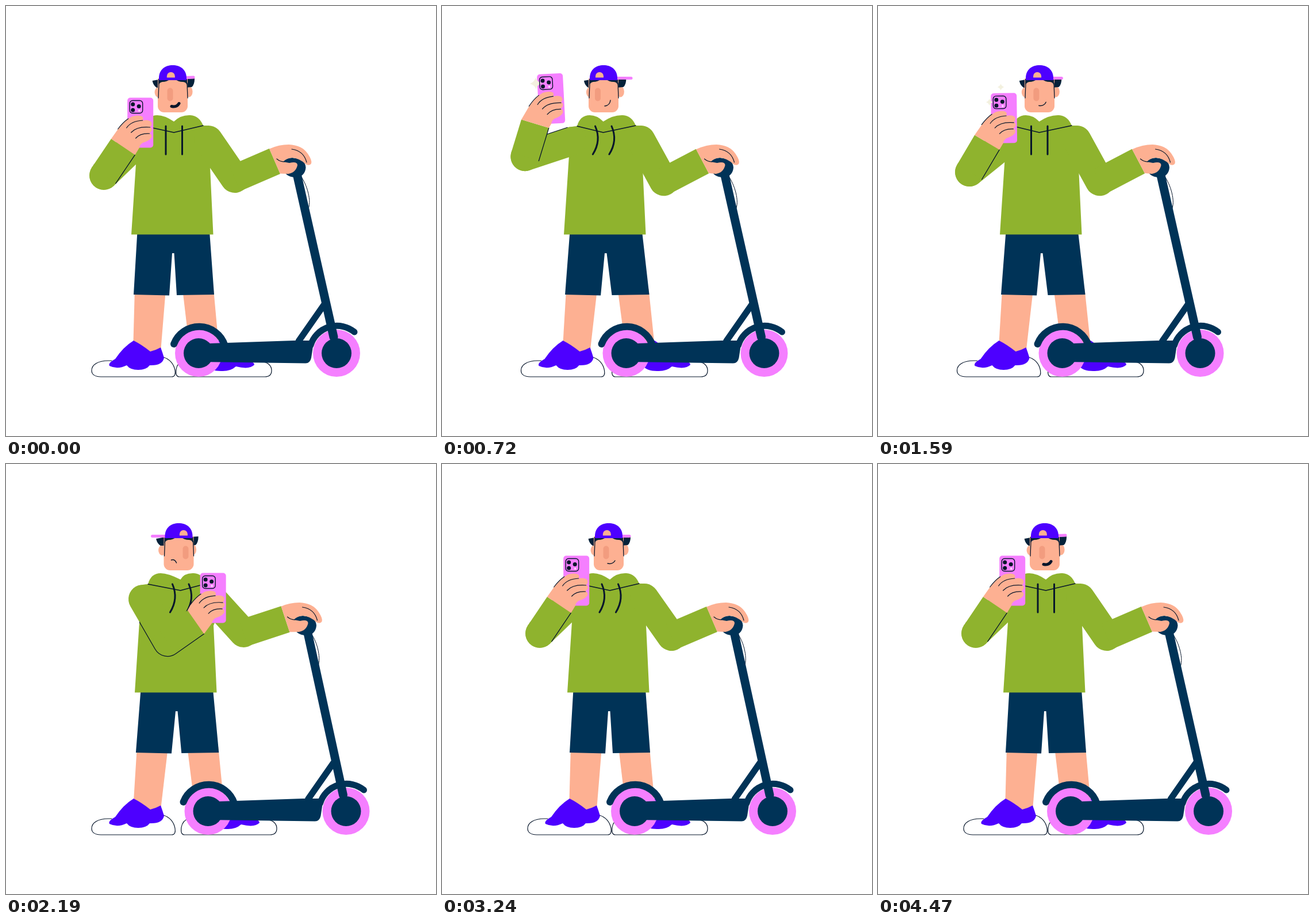
Animation of 748 by 748 pixels, one loop 4.5 s. Source, as an HTML page with a canvas:

```html
<!DOCTYPE html>
<html lang="en">
<head>
<meta charset="utf-8">
<title>Scooter selfie</title>
<style>
html, body { margin: 0; width: 100%; height: 100%; overflow: hidden; background: #fff; }
canvas { display: block; width: 748px; height: 748px; }
</style>
</head>
<body>
<canvas id="stage" width="748" height="748"></canvas>
<script>
const g = document.getElementById('stage').getContext('2d');
const LOOP = 4500, RAD = Math.PI / 180;
const GREEN = '#8fb32e', NAVY = '#003357', INK = '#07162b', HAIR = '#04223a', PURPLE = '#4d00ff',
  SKIN = '#fdb092', NOSE = '#f29c7f', PINK = '#f57fff', CREAM = '#f3f1df';

// Angles in degrees; the mouth is a curve of start, control and end.
const LEFT = { up: 161.6, fore: -73, tilt: -3, turn: -1, brim: 48, mouth: [2, 4, 11, 3, 12, -6] };
const MID = { up: 136, fore: -56, tilt: 0, turn: -.45, brim: 36, mouth: [-2, 3, 7, 5, 11, -2] };
const RIGHT = { up: 60, fore: -35, tilt: 0, turn: 1.2, brim: -46, mouth: [-13, -3, -7, -5, -4, 2] };

const mix = (a, b, k) => Array.isArray(a) ? a.map((v, i) => mix(v, b[i], k)) : a + (b - a) * k;
function blend(w) {
  const to = w < 0 ? LEFT : RIGHT, p = {};
  for (const key in MID) p[key] = mix(MID[key], to[key], Math.abs(w));
  return p;
}
const span = (t, a, b) => Math.min(1, Math.max(0, (t - a) / (b - a)));
const move = (t, a, b) => { const k = span(t, a, b); return k * k * (3 - 2 * k); };
const bump = (t, a, b) => Math.sin(Math.PI * span(t, a, b)) ** 2;

function fill(d, color) {
  g.fillStyle = color;
  g.fill(new Path2D(d));
}
function line(d, width = 1.2, color = INK, cap = 'round') {
  g.strokeStyle = color;
  g.lineWidth = width;
  g.lineCap = cap;
  g.lineJoin = 'round';
  g.stroke(new Path2D(d));
}
function oval(x, y, rx, color, ry = rx) {
  g.fillStyle = color;
  g.beginPath();
  g.ellipse(x, y, rx, ry, 0, 0, 7);
  g.fill();
}
function box(x, y, w, h, r, color) {
  g.beginPath();
  g.roundRect(x, y, w, h, r);
  if (color) { g.fillStyle = color; g.fill(); }
}
function group(x, y, draw, angle = 0) {
  g.save();
  g.translate(x, y);
  g.rotate(angle * RAD);
  draw();
  g.restore();
}
const poly = pts => 'M' + pts.map(p => p.join()).join('L') + 'Z';
const polar = ([x, y], deg, r) => [x + r * Math.cos(deg * RAD), y + r * Math.sin(deg * RAD)];

function leftFoot() {
  line('M184 617H178C160 617 149 624 149 634C149 641 155 645 165 645H288C294 645 295 640 294 634C292 622 284 614 274 611');
  fill('M222 582Q236 589 251 601Q260 599 269 594Q272 602 275 612Q272 626 250 625Q244 633 230 633Q216 633 210 625Q194 633 180 626Q177 621 190 614Q204 593 222 582Z', PURPLE);
}
function rightFoot() {
  line('M430 619H444C456 619 462 626 462 634C462 641 458 645 450 645H302C296 645 295 640 296 632Q298 620 310 616');
  fill('M370 582Q386 592 404 612Q432 617 432 624Q424 633 400 627Q390 636 374 635Q356 635 350 626Q326 626 320 612L322 596Z', PURPLE);
}

function legs({ b, q, dy, footL, footR }) {
  const hl = mix(b, footL, .35), hr = mix(b, footR, .75), up = Math.min(0, dy) * .4;
  fill(poly([[224 + hl - 11 * q, 492], [278 + hl - 12 * q, 492], [269 + footL - q, 602], [221 + footL, 602]]), SKIN);
  fill(poly([[307 + hr + 10 * q, 492], [361 + hr + 8 * q, 492], [371 + footR, 602], [320 + footR + 3 * q, 602]]), SKIN);
  group(footL, 0, leftFoot);
  group(footR, 0, rightFoot);
  const crotch = 430 + dy;
  fill(poly([
    [228.5 + b - 2 * q, 392 + dy], [354 + b, 392 + dy],
    [362 + hr + 13 * q, 502 - 4 * q + up], [297 + hr + 15 * q, 503 + 4 * q + up],
    [292.5 + b + 5 * q, crotch], [289 + b - 7 * q, crotch],
    [284 + hl - 16 * q, 503.5 + 4.5 * q + up], [222 + hl - 15 * q, 502 - 4 * q + up]
  ]), NAVY);
}

const hoodie = v => `M218 397.5L227 260L232 210Q238 209 241 209Q246 190 263 190Q276 190 ${292 + v} 201Q304 189 321 190Q336 191 343 208L353 208L372 240L355 281L360.5 397.5Z`;

function torso({ vee, sway }) {
  fill(hoodie(vee), GREEN);
  line(`M241 209L${292 + vee} 220L343 208`, 1.3);
  for (const x of [278 + vee, 306.5 + vee])
    line(`M${x} 209Q${x + 1.6 * sway} 234 ${x - .6 * sway} 258`, 3);
}

function head({ turn, brim, brimTilt, mouth: m, grin }) {
  const side = -2.4 * turn;
  oval(-26 + side, 150, 6.5, SKIN, 9);
  oval(27 + side, 149, 6.5, SKIN, 9.5);
  group(side, 0, () => fill('M-36.5 130L-20 127H20L37 126Q37 137 32 141L20 142V132H-20V142L-29 142Q-35 138 -36.5 130Z', HAIR));
  box(-26, 126, 52, 59, [0, 0, 11, 11], SKIN);
  line('M-24 134L-25 160M25 134L26 160', 1.3);
  fill('M-25 127H-4Q-10 132 -18 132Q-23 133 -25 138ZM4 127H25V138Q23 132 18 132Q9 132 4 127Z', HAIR);
  box(10 * turn - 5, 142.5, 10, 23, 5, NOSE);
  line(`M0 125.5L${brim} ${125.5 + brimTilt}`, 5, PINK);
  fill('M-24 129V124C-23 110 -13 103 0 103C13 103 23 110 24 124V129Z', PURPLE);
  const o = 7 * turn;
  fill(`M${o - 7} 124.5V122A7 7 0 0 1 ${o + 7} 122V124.5Z`, SKIN);
  const y = 170 + 1.5 * grin;
  line(`M${m[0]} ${y + m[1]}Q${m[2]} ${y + m[3]} ${m[4]} ${y + m[5]}`, 1.4 + 3.6 * grin);
}

function scooter(h) {
  for (const x of [335, 575]) {
    oval(x, 604, 41, PINK);
    oval(x, 604, 26, NAVY);
  }
  line('M292 588A47 47 0 0 1 380.500 590', 12, NAVY);
  line('M530 590A48 48 0 0 1 606 567', 11, NAVY);
  fill('M338 587.5L500 582H528Q535 584 534 592L531 612Q529 621.500 521 621.500L338 619Z', NAVY);
  line('M553 520L509 583', 11, NAVY);
  line(`M${513 + h} 296C${523 + h} 310 533 340 525 355`, 1);
  line(`M${506 + h} 292L570 576`, 15, NAVY);
  group(h, 0, () => fill('M481 271Q488 264 498 264Q521 266 521.500 281Q520 298 502 298Q486 297 483 284Z', NAVY));
}

function rightArm({ b, s, dy, handle }) {
  const x = s + handle, cuff = [467.5 + x, 270];
  const sh = [352 + b, 233 + dy], el = [398 + .85 * s + .6 * handle, 300 - .37 * s + Math.max(0, dy)];
  line(`M${sh}L${el}`, 50, GREEN);
  line(`M${el}L${cuff}`, 48, GREEN, 'butt');
  const a = Math.atan2(cuff[1] - el[1], cuff[0] - el[0]) / RAD;
  const top = polar([467.5, 270], a - 90, 23.5), low = polar([467.5, 270], a + 90, 23.5);
  group(x, 0, () => {
    fill(`M${top}Q475 241 492 241Q515 242 525 257Q533 269 531 274Q528 279 521 275Q511 265 498 264Q489 264 482 271L493 273Q507 270 507 277Q504 290 491 292L${low}Z`, SKIN);
    line('M497 249Q518 252 523 272M471 266Q477 271 484 271');
  });
}

function star(x, y, r) {
  const tips = [0, 90, 180, 270].map(a => {
    const [cx, cy] = polar([x, y], a + 45, r * .35);
    return `Q${cx} ${cy} ${polar([x, y], a + 90, r)}`;
  });
  fill(`M${x + r} ${y}${tips.join('')}Z`, CREAM);
}

function phone(t) {
  box(-22.5, -43.5, 45, 87, 5, PINK);
  [750, 1020, 1540, 1620, 2800].forEach((peak, i) => {
    const r = (11 - 1.6 * i) * bump(t, peak - 160, peak + 160);
    if (r) star(i % 2 ? -5 : -25, i % 2 ? -54 : -28, r);
  });
  box(-18.5, -38.5, 22.5, 22, 5);
  g.strokeStyle = INK;
  g.lineWidth = 1.4;
  g.stroke();
  for (const [x, y] of [[-13, -32], [-13, -22], [-2.5, -28.5]]) oval(x, y, 3.5, INK);
  oval(-2, -21, 1.7, '#ffe3ff');
}

function leftArm({ b, dy, vee, up, fore, tilt }, t) {
  const sh = [232 + b, 235 + dy], el = polar(sh, up, 86), cuff = polar(el, fore, 60);
  const edge = (pt, deg) => polar(pt, deg + 90, 25);
  const outer = up - fore < 180;
  line(`M${sh}L${el}`, 50, GREEN);
  if (!outer) line(`M${edge(sh, up)}L${edge(el, up)}`);
  line(`M${el}L${el}`, 50, GREEN);
  line(`M${el}L${cuff}`, 50, GREEN, 'butt');
  if (outer) {
    // The sleeve edge only reads against the hoodie.
    g.save();
    g.translate(b, dy);
    g.clip(new Path2D(hoodie(vee)));
    g.translate(-b, -dy);
    line(`M${edge(sh, up)}L${edge(el, up)}A25 25 0 0 0 ${edge(el, fore)}L${edge(cuff, fore)}`, 1.3);
    g.restore();
  } else {
    line(`M${edge(el, fore)}L${edge(cuff, fore)}`, 1.3);
  }
  group(...cuff, () => {
    group(30, -42, () => phone(t));
    const a = polar([0, 0], fore - tilt - 90, 25), c = polar([0, 0], fore - tilt + 90, 25);
    fill(`M${a}L-8 -32Q2 -46 16 -53Q27 -56 33 -53Q37 -49 33 -46Q46 -48 49 -43Q51 -38 47 -35Q51 -33 50 -29Q49 -26 46 -24Q51 -21 49 -16Q45 -10 34 -7Q29 -4 28 2L${c}Z`, SKIN);
    line('M-9 -31Q0 -43 9 -49M6 -33Q14 -45 34 -46M14 -25Q24 -36 47 -34M22 -15Q30 -24 46 -23');
  }, tilt);
}

function poseAt(t) {
  const away = move(t, 40, 490), back = move(t, 1650, 2160), home = move(t, 2700, 3220);
  const u = 2 * back - away - home;
  const p = blend(.8 * move(t, 1140, 1590) + 1.2 * back - away - home);
  const right = Math.max(0, u);

  p.q = bump(t, 0, 250) + bump(t, 1650, 1900) + bump(t, 2540, 2840);
  const hop = bump(t, 180, 500) + bump(t, 1840, 2160) + bump(t, 2200, 2560);
  p.dy = 2.7 * p.q - 9 * hop - 2 * bump(t, 3810, 4320);

  p.sway = 0;
  for (const from of [0, 1650, 2700]) p.sway += 7 * Math.sin(Math.PI * span(t, from, from + 1300));

  p.grin = 1 - move(t, 40, 400) + move(t, 3280, 3600);
  p.brimTilt = -1.5 * p.grin - 3 * p.q * right;
  p.brim += 7 * p.q * right;
  p.turn -= .4 * p.q * right;
  p.handle = 2 * (back - move(t, 3240, 3750));

  p.u = u;
  p.b = 6 * u;
  p.vee = 5.5 * u;
  p.s = (u < 0 ? 14.5 : 16.5) * u;
  p.footL = Math.min(0, 11.5 * u);
  p.footR = 9 * right;
  p.headX = 290 + (u < 0 ? 9 : 10.5) * u + 3 * p.q * right;
  return p;
}

function draw(t) {
  const p = poseAt(t);
  g.fillStyle = '#fff';
  g.fillRect(0, 0, 748, 748);
  legs(p);
  group(p.s, 0, () => scooter(p.handle));
  group(p.b, p.dy, () => torso(p));
  rightArm(p);
  group(p.headX, p.dy, () => head(p));
  leftArm(p, t);
}

const start = performance.now();
function tick() {
  draw((performance.now() - start) % LOOP);
  requestAnimationFrame(tick);
}
tick();
</script>
</body>
</html>
```
